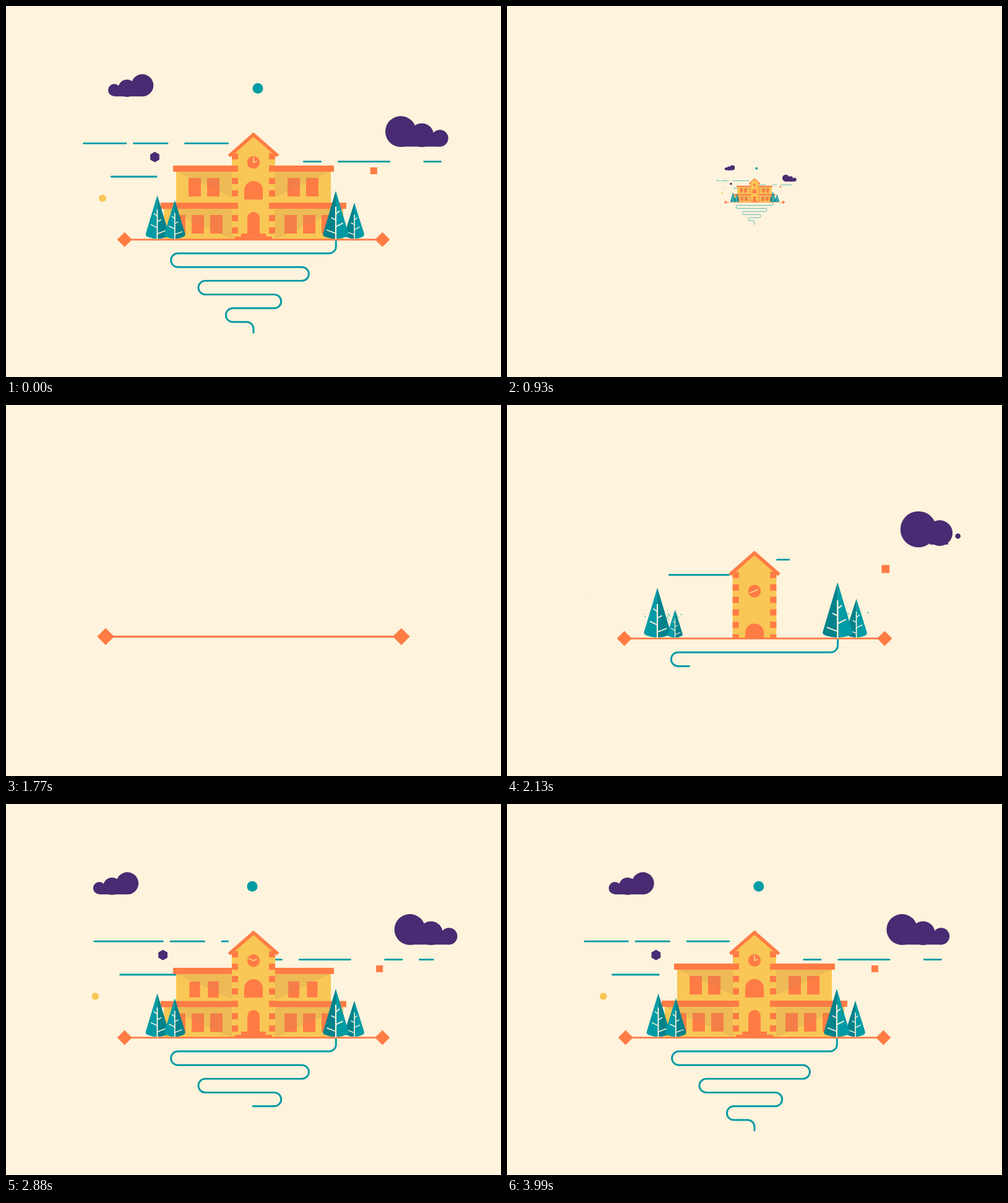
Recreate the animation shown at these times as an HTML page with a canvas. Size 800 by 600 pixels, loop 4020 ms.

```html
<!DOCTYPE html>
<html lang="en">
<head>
<meta charset="utf-8">
<title>School house</title>
<style>
html, body { margin: 0; width: 100%; height: 100%; overflow: hidden; background: #fef3dc; }
canvas { display: block; width: 800px; height: 600px; }
</style>
</head>
<body>
<canvas id="stage" width="800" height="600"></canvas>
<script>
const ctx = document.getElementById('stage').getContext('2d');
const LOOP = 4020;
const BG = '#fef3dc', ORANGE = '#ff7c45', YELLOW = '#f9c755', TEAL = '#009ba5',
      DARK = '#00828b', PURPLE = '#482b72', SHADE = 'rgba(194,134,88,.2)';

const clamp = x => Math.max(0, Math.min(1, x));
const mix = (a, b, k) => a + (b - a) * k;
const smooth = x => { x = clamp(x); return x * x * (3 - 2 * x); };
const settle = (t, start, tau) => t < start ? 0 : 1 - Math.exp(-(t - start) / tau);
const cubicOut = x => 1 - Math.pow(1 - clamp(x), 3);

// grows with an overshoot
function pop(t, start, dur = 400) {
  const u = clamp((t - start) / dur) - 1, c = 2.3;
  return Math.max(0, 1 + (c + 1) * u * u * u + c * u * u);
}

function rng(seed) {
  return () => (seed = (seed * 16807) % 2147483647) / 2147483647;
}

function rect(x, y, w, h, color) {
  ctx.fillStyle = color;
  ctx.fillRect(x, y, w, h);
}

function disc(x, y, r, color) {
  if (r <= 0) return;
  ctx.fillStyle = color;
  ctx.beginPath();
  ctx.arc(x, y, r, 0, Math.PI * 2);
  ctx.fill();
}

function poly(points, color) {
  ctx.fillStyle = color;
  ctx.beginPath();
  points.forEach(p => ctx.lineTo(p[0], p[1]));
  ctx.closePath();
  ctx.fill();
}

function line(points, color, width, cap = 'round') {
  ctx.strokeStyle = color;
  ctx.lineWidth = width;
  ctx.lineCap = cap;
  ctx.beginPath();
  points.forEach(p => ctx.lineTo(p[0], p[1]));
  ctx.stroke();
}

function diamond(x, y, r, color) {
  poly([[x - r, y], [x, y - r], [x + r, y], [x, y + r]], color);
}

// sliding dashes seen through the window a..b
function dashes(y, a, b, anchor, parts, period) {
  if (b - a < 2) return;
  const first = Math.floor((a - anchor) / period) - 1;
  for (let i = first; anchor + i * period < b + period; i++) {
    for (const [from, to] of parts) {
      const l = Math.max(a, anchor + i * period + from);
      const r = Math.min(b, anchor + i * period + to);
      if (r > l) line([[l + 1.3, y], [Math.max(l + 1.4, r - 1.3), y]], TEAL, 2.8);
    }
  }
}

function wind(t) {
  const d = t - LOOP;
  const a = 360 - 236 * settle(t, 2140, 285);
  const b = 435 + 269 * settle(t, 2110, 250);
  const c = 360 - Math.min(191, 195 * settle(t, 1818, 450));
  dashes(222.2, a, 360, 205.3 - 0.0522 * d, [[0, 57], [83, 213]], 223);
  dashes(251.6, 435, b, 480 + 0.0555 * d, [[0, 30], [56, 141]], 194.5);
  dashes(276, c, 360, 244.5 - 0.075 * d, [[69, 269]], 269);
}

// puffs: [x, y, r, start]; the flat base joins the outer puffs
function cloud(t, dx, puffs, bottom) {
  puffs.forEach(([x, y, r, start]) => disc(x + dx, y, r * pop(t, start), PURPLE));
  const [p, , q] = puffs;
  const k = cubicOut((t - q[3] + 30) / 300);
  const mid = puffs[1][0];
  const l = mix(mid, p[0], k), r = mix(mid, q[0], k);
  if (k > 0) rect(Math.min(l, r) + dx, bottom - 14 * k, Math.abs(r - l), 14 * k, PURPLE);
}

function sky(t) {
  const d = t - LOOP;
  cloud(t, 0.0212 * d, [[220.3, 128.3, 18, 2180], [195.5, 133, 14, 2230], [175, 136, 10, 2300]], 146.2);
  cloud(t, -0.0129 * d, [[638, 203, 25, 1890], [672, 209, 19.3, 1990], [701.2, 213.8, 13.6, 2105]], 227.4);
  disc(407 + 0.0079 * d, 133.2, 8.5 * pop(t, 2200), TEAL);
  disc(156 + 0.0103 * d, 311, 5.8 * pop(t, 2118), YELLOW);
  const s = 11 * pop(t, 1890);
  rect(594.3 - 0.0082 * d - s / 2, 266.5 - s / 2, s, s, ORANGE);
  const r = 8.5 * pop(t, 2180), hx = 240.5 - 0.0115 * d;
  poly([0, 1, 2, 3, 4, 5].map(i => {
    const a = Math.PI / 6 + i * Math.PI / 3;
    return [hx + r * Math.cos(a), 244.3 + r * Math.sin(a)];
  }), PURPLE);
}

function arch(cx, top, w, h) {
  ctx.fillStyle = ORANGE;
  ctx.beginPath();
  ctx.arc(cx, top + w / 2, w / 2, Math.PI, 0);
  ctx.lineTo(cx + w / 2, top + h);
  ctx.lineTo(cx - w / 2, top + h);
  ctx.fill();
}

function pane(cx, cy, k) {
  rect(cx - 10 * k, cy - 15 * k, 20 * k, 30 * k, ORANGE);
}

// both halves are mirrored around the tower
function wing(t, start, depth, half, top, panes, paneStart) {
  if (t < start) return;
  const dy = depth * (1 - settle(t, start, 140));
  const h = top < 300 ? 50 : 51;
  rect(400 - half, top + 10 + dy, half * 2, h, YELLOW);
  for (const side of [-1, 1]) {
    panes.forEach((x, i) =>
      pane(400 + side * x, top + 35 + dy, cubicOut((t - paneStart - i * 18) / 400)));
    poly([[400 + side * half, top + 10 + dy], [400 + side * 35, top + 10 + dy],
          [400 + side * 35, top + 10 + dy + (h > 50 ? 49 : 41)]], SHADE);
  }
  rect(395 - half, top + dy, half * 2 + 10, 10, ORANGE);
}

function tower(t) {
  if (t < 1900) return;
  const dy = 172 * (1 - settle(t, 1900, 140));
  ctx.save();
  ctx.translate(0, dy);
  poly([[365, 240], [400, 209], [435, 240], [435, 378], [365, 378]], YELLOW);
  for (let y = 238; y < 378; y += 20) {
    rect(365, y, 10, 10, ORANGE);
    rect(425, y, 10, 10, ORANGE);
  }
  line([[360.5, 242.5], [400, 208], [439.5, 242.5]], ORANGE, 5.6, 'butt');
  ctx.restore();

  const cy = 253 + 134 * (1 - settle(t, 1990, 140));
  disc(400, cy, 10.2, ORANGE);
  const hand = (deg, len) => {
    const a = deg * Math.PI / 180;
    line([[400, cy], [400 + len * Math.sin(a), cy - len * Math.cos(a)]], '#fbd686', 1.6);
  };
  hand(0.058 * (t - LOOP), 8);
  hand(72 + 0.005 * (t - LOOP), 5.5);

  arch(400, 283 + 95 * (1 - settle(t, 2090, 140)), 30, 30);
  arch(400, 333 + 46 * (1 - settle(t, 2200, 140)), 20, 36);
  const step = 12 * (1 - settle(t, 2250, 140));
  rect(380, 368 + step, 40, 6, ORANGE);
  rect(370, 373 + step, 60, 5, ORANGE);
}

function house(t) {
  ctx.save();
  ctx.beginPath();
  ctx.rect(0, 0, 800, 378);
  ctx.clip();
  wing(t, 2558, 70, 125, 258, [65, 95], 2675);
  wing(t, 2250, 62, 145, 318, [60, 90, 120], 2420);
  tower(t);
  ctx.restore();
}

// side: the direction of the lit half
function tree(t, x, w, h, side, start) {
  const k = pop(t, start);
  if (k <= 0) return;
  ctx.save();
  ctx.translate(x, 376.5);
  ctx.scale(k * side, k);
  const halfLeaf = (dir, color) => {
    ctx.fillStyle = color;
    ctx.beginPath();
    ctx.moveTo(0, -h);
    ctx.lineTo(dir * w * 0.97, -9);
    ctx.quadraticCurveTo(dir * w * 1.06, -5, dir * w * 0.8, -3);
    ctx.quadraticCurveTo(dir * w * 0.4, 0, 0, 0);
    ctx.fill();
  };
  halfLeaf(1, TEAL);
  halfLeaf(-1, DARK);
  ctx.scale(w / 19, h / 71);
  const twig = (x1, y1, y2) => line([[0, y1], [x1, y2]], BG, 1.6);
  line([[0, 0], [0, -47]], BG, 1.9);
  twig(10, -18, -23);
  twig(-13, -8, -13);
  twig(-6, -28, -31);
  twig(5, -37, -41);
  ctx.restore();
}

function burst(t, x, y, start, seed) {
  const u = (t - start) / 850;
  if (u <= 0 || u >= 1) return;
  const rand = rng(seed), out = cubicOut(u * 1.5);
  for (let i = 0; i < 13; i++) {
    const a = -Math.PI * (0.02 + 0.96 * rand());
    const reach = (16 + 22 * rand()) * out;
    const size = 1.3 * rand() * (1 - u) + 0.25;
    const px = x + Math.cos(a) * reach * 1.1, py = y + Math.sin(a) * reach * 0.8;
    line([[px, py], [px + Math.cos(a) * size, py + Math.sin(a) * size]], TEAL, size);
  }
}

function trees(t) {
  burst(t, 244, 344, 1970, 71);
  burst(t, 272, 350, 2030, 912);
  burst(t, 530, 356, 1970, 435);
  burst(t, 562, 346, 1990, 1207);
  tree(t, 244.5, 19, 70.5, -1, 1960);
  tree(t, 272.8, 17, 62.5, -1, 2060);
  tree(t, 563, 16, 58.5, 1, 1990);
  tree(t, 533, 21, 77.5, 1, 1950);
}

// winding road, each bend one row lower
const road = (() => {
  const p = new Path2D(), r = 11.1;
  let y = 400;
  p.moveTo(533.3, 378);
  p.lineTo(533.3, y - r);
  p.arc(533.3 - r, y - r, r, 0, Math.PI / 2);
  [277.7, 478.3, 322, 433.6, 366.5].forEach((x, i) => {
    p.lineTo(x, y);
    p.arc(x, y + r, r, -Math.PI / 2, Math.PI / 2, i % 2 === 0);
    y += 2 * r;
  });
  p.lineTo(400 - r, y);
  p.arc(400 - r, y + r, r, -Math.PI / 2, 0);
  p.lineTo(400, 545);
  return p;
})();

function drawRoad(t) {
  const len = 1036 * settle(t, 1971, 425);
  if (len <= 0) return;
  ctx.strokeStyle = TEAL;
  ctx.lineWidth = 2.9;
  ctx.lineCap = 'round';
  ctx.setLineDash([len, 3000]);
  ctx.stroke(road);
  ctx.setLineDash([]);
}

function ground() {
  line([[191.5, 377.8], [608.5, 377.8]], ORANGE, 2.8);
  diamond(191.7, 377.8, 12, ORANGE);
  diamond(608.3, 377.8, 12, ORANGE);
}

function scene(t) {
  const leave = 1 - smooth((t - 4500) / 650);
  if (leave <= 0) return;
  const enter = 1 + 0.365 * Math.exp(-(t - 1650) / 133);
  ctx.save();
  ctx.translate(400, 300);
  ctx.scale(leave, leave);
  ctx.translate(0, 100);
  ctx.scale(enter, enter);
  ctx.translate(-400, -400);
  wind(t);
  sky(t);
  drawRoad(t);
  house(t);
  ground();
  trees(t);
  ctx.restore();
}

// the large diamond that splits into the two ends of the ground line
function gem(t) {
  const k = smooth((t - 1500) / 150);
  const r = mix(58 * pop(t, 1090, 330), 16.4, k);
  if (r <= 0) return;
  const x = mix(mix(400, 382, smooth((t - 1150) / 270)), 400, k);
  const y = mix(301.7, 369.7, k);
  const spread = 284.6 * k;
  const color = `rgb(255,${mix(127, 124, k)},${mix(14, 69, k)})`;
  if (k > 0) line([[x - spread, y], [x + spread, y]], color, 3.8);
  diamond(x - spread, y, r, color);
  if (k > 0) diamond(x + spread, y, r, color);

  const from = 134 * smooth((t - 1450) / 80), to = 134 * smooth((t - 1310) / 110);
  if (to > from + 0.5) {
    ctx.lineJoin = 'round';
    ctx.setLineDash([0, from, to - from, 500]);
    line([[x + 3.5, y - 45], [x + 49, y - 0.5], [x - 0.5, y + 49]], '#ffb972', 5);
    ctx.setLineDash([]);
    ctx.lineJoin = 'miter';
  }
}

function draw(now) {
  let t = now % LOOP;
  rect(0, 0, 800, 600, BG);
  if (t >= 1090 && t < 1650) gem(t);
  if (t < 1300) t += LOOP;
  if (t >= 1650) scene(t);
}

const begin = performance.now();
function tick() {
  draw(performance.now() - begin);
  requestAnimationFrame(tick);
}
tick();
</script>
</body>
</html>
```
